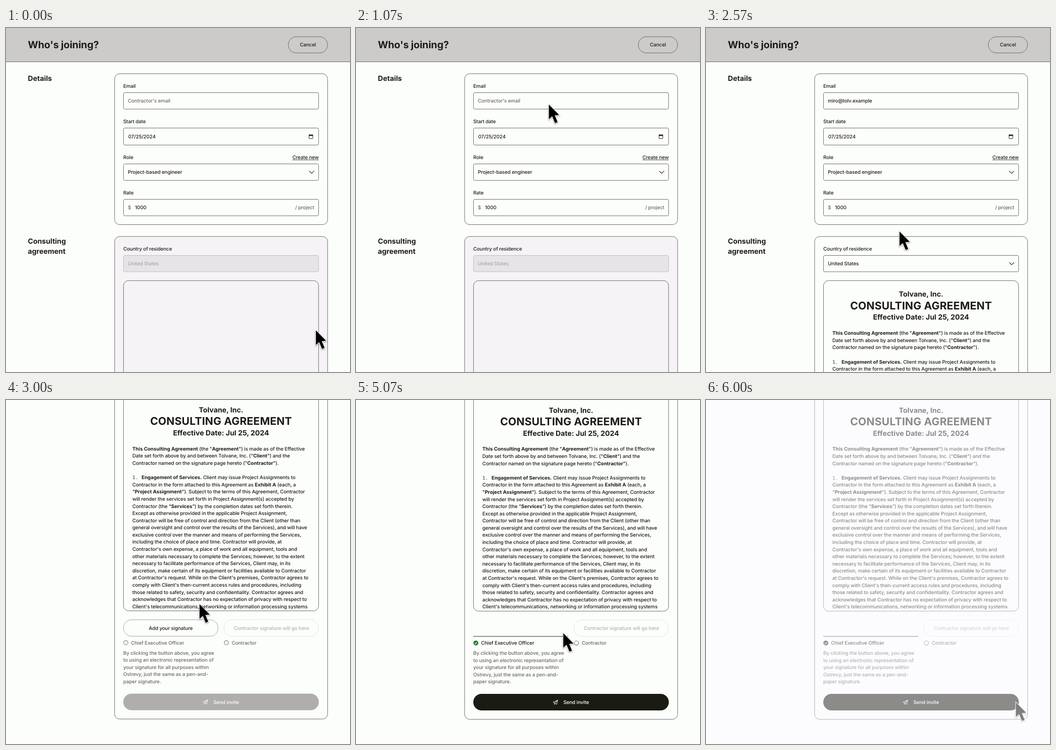
These frames come from a looping animation (748 px wide and 748 px high, 6030 ms). An HTML page with a canvas:

```html
<!DOCTYPE html>
<html lang="en">
<head>
<meta charset="utf-8">
<title>Invite a contractor</title>
<style>
  html, body { margin: 0; width: 100%; height: 100%; overflow: hidden; background: #fcfefb; }
  canvas { display: block; width: 748px; height: 748px; }
</style>
</head>
<body>
<canvas id="stage"></canvas>
<script>
const SIZE = 748, LOOP = 6030, LINE = 15.59;
const INK = '#1d1d17', GREY = '#6a6a67', PALE = '#b3b2b1', EDGE = '#62635f', PAPER = '#fcfefb';
const EMAIL = 'miro@tolv.example';
const SHOWN = 1800, SIGNED = 4470;

const canvas = document.getElementById('stage');
const ctx = canvas.getContext('2d');
const dpr = window.devicePixelRatio || 1;
canvas.width = canvas.height = SIZE * dpr;

const SANS = 'Inter, "Liberation Sans", sans-serif';
const MONO = '"Noto Sans Mono", "DejaVu Sans Mono", monospace';

// name: [weight, size, letter spacing, family]
const STYLES = {
  body: [500, 10.7, -0.1, SANS],
  bold: [700, 10.7, 0, SANS],
  mark: [500, 10.7, 0, MONO],
  title: [700, 21.6, -0.15, SANS],
  head: [700, 15.5, 0, SANS],
  big: [700, 23.2, 0.2, SANS]
};

const INTRO = [
  '*This Consulting Agreement* (the "*Agreement*") is made as of the Effective',
  'Date set forth above by and between Tolvane, Inc. ("*Client*") and the',
  'Contractor named on the signature page hereto ("*Contractor*").'
];
const TERMS = [
  '*Engagement of Services.* Client may issue Project Assignments to',
  'Contractor in the form attached to this Agreement as *Exhibit A* (each, a',
  '"*Project Assignment*"). Subject to the terms of this Agreement, Contractor',
  'will render the services set forth in Project Assignment(s) accepted by',
  'Contractor (the "*Services*") by the completion dates set forth therein.',
  'Except as otherwise provided in the applicable Project Assignment,',
  'Contractor will be free of control and direction from the Client (other than',
  'general oversight and control over the results of the Services), and will have',
  'exclusive control over the manner and means of performing the Services,',
  'including the choice of place and time. Contractor will provide, at',
  "Contractor's own expense, a place of work and all equipment, tools and",
  'other materials necessary to complete the Services; however, to the extent',
  'necessary to facilitate performance of the Services, Client may, in its',
  'discretion, make certain of its equipment or facilities available to Contractor',
  "at Contractor's request. While on the Client's premises, Contractor agrees to",
  "comply with Client's then-current access rules and procedures, including",
  'those related to safety, security and confidentiality. Contractor agrees and',
  'acknowledges that Contractor has no expectation of privacy with respect to',
  "Client's telecommunications, networking or information processing systems"
];
const NOTE = [
  'By clicking the button above, you agree',
  'to using an electronic representation of',
  'your signature for all purposes within',
  'Ostrevy, just the same as a pen-and-',
  'paper signature.'
];

const clamp = v => Math.min(1, Math.max(0, v));
const part = (t, from, to) => clamp((t - from) / (to - from));
const smooth = u => u * u * (3 - 2 * u);
const cubic = u => u < 0.5 ? 4 * u ** 3 : 1 - 4 * (1 - u) ** 3;
const mix = (a, b, u) => a + (b - a) * u;

function setStyle(style) {
  const [weight, size, gap, family] = STYLES[style];
  ctx.font = `${weight} ${size}px ${family}`;
  ctx.letterSpacing = gap + 'px';
  ctx.textRendering = 'geometricPrecision';
}

function text(str, x, y, style = 'body', color = INK, align = 'left') {
  setStyle(style);
  ctx.fillStyle = color;
  ctx.textAlign = align;
  ctx.fillText(str, x, y);
  return ctx.measureText(str).width;
}

// Text between asterisks is bold.
function rich(str, x, y) {
  str.split('*').forEach((run, i) => { if (run) x += text(run, x, y, i % 2 ? 'bold' : 'body'); });
}

function box(x0, y0, x1, y1, r, stroke, fill, dash = []) {
  ctx.beginPath();
  ctx.roundRect(x0, y0, x1 - x0, y1 - y0, r);
  if (fill) { ctx.fillStyle = fill; ctx.fill(); }
  if (stroke) {
    ctx.setLineDash(dash);
    ctx.strokeStyle = stroke;
    ctx.lineWidth = 1;
    ctx.stroke();
    ctx.setLineDash([]);
  }
}

function line(points, color, width, close) {
  ctx.beginPath();
  points.forEach(([x, y]) => ctx.lineTo(x, y));
  if (close) ctx.closePath();
  ctx.strokeStyle = color;
  ctx.lineWidth = width;
  ctx.lineJoin = 'round';
  ctx.stroke();
}

const field = (y0, y1) => box(255.5, y0, 679.7, y1, 3, EDGE);
const chevron = y => line([[659.3, y - 2.6], [664.6, y + 2.7], [669.9, y - 2.6]], INK, 1.2);

function ring(x, y) {
  ctx.beginPath();
  ctx.arc(x, y, 4.6, 0, 7);
  ctx.strokeStyle = GREY;
  ctx.lineWidth = 1.1;
  ctx.stroke();
}

function header() {
  ctx.fillStyle = '#cccbc9';
  ctx.fillRect(0, 0, SIZE, 73);
  ctx.fillStyle = EDGE;
  ctx.fillRect(0, 73, SIZE, 1);
  text("Who's joining?", 47.5, 43.5, 'title');
  box(613.8, 19, 699.2, 54.2, 17.6, EDGE);
  text('Cancel', 656.5, 40.3, 'body', INK, 'center');
}

function details(t) {
  text('Details', 47.5, 115, 'head');
  box(236.2, 99.5, 699.3, 427.5, 11, EDGE);

  text('Email', 255, 130);
  field(140.5, 176.3);
  const typed = Math.floor((t - 1215) / 33);
  if (typed > 0) text(EMAIL.slice(0, typed), 265, 162);
  else text("Contractor's email", 265, 162, 'body', GREY);

  text('Start date', 255, 206.7);
  field(217.5, 254.5);
  text('07/25/2024', 265.7, 240);
  box(659, 232.6, 667, 240.6, 0.8, INK);
  ctx.fillStyle = INK;
  ctx.fillRect(658.5, 232, 9, 2.6);
  ctx.fillRect(660, 231, 1.2, 1.5);
  ctx.fillRect(664.8, 231, 1.2, 1.5);

  text('Role', 255, 285);
  const w = text('Create new', 680, 285, 'body', INK, 'right');
  ctx.fillRect(680 - w, 286.4, w, 0.9);
  field(295.5, 331.3);
  text('Project-based engineer', 265, 317.4);
  chevron(313.5);

  text('Rate', 255, 361.7);
  field(372.5, 408.3);
  text('$', 265, 394.2, 'body', GREY);
  text('1000', 280.5, 394.2);
  text('/ project', 670.3, 394.2, 'body', GREY, 'right');
}

function contract() {
  ctx.save();
  ctx.beginPath();
  ctx.rect(256, 550, 423, 465.5);
  ctx.clip();
  text('Tolvane, Inc.', 467.6, 584.4, 'head', INK, 'center');
  text('CONSULTING AGREEMENT', 467.6, 611.7, 'big', INK, 'center');
  text('Effective Date: Jul 25, 2024', 467.6, 634.4, 'head', INK, 'center');
  INTRO.forEach((s, i) => rich(s, 274.7, 667.3 + i * LINE));
  text('1.', 274.7, 667.3 + 4 * LINE, 'mark');
  TERMS.forEach((s, i) => rich(s, i ? 274.7 : 294.7, 667.3 + (i + 4) * LINE));
  ctx.restore();
}

function plane(x, y) {
  line([[x, y + 4.6], [x + 10, y], [x + 7.8, y + 9.4], [x + 4.4, y + 7.2], [x + 2.7, y + 9.6], [x + 2.6, y + 6]],
    '#fff', 0.9, true);
  line([[x + 2.6, y + 6], [x + 10, y], [x + 4.4, y + 7.2]], '#fff', 0.8);
}

function signing(t, fade) {
  const done = t >= SIGNED;
  if (done) {
    ctx.fillStyle = INK;
    ctx.fillRect(255, 1070.4, 206.2, 1);
    ctx.beginPath();
    ctx.arc(260.6, 1085.2, 5.4, 0, 7);
    ctx.fillStyle = fade > 0 ? '#30312c' : '#257a27';
    ctx.fill();
    line([[258, 1085.3], [259.9, 1087.2], [263.3, 1083.3]], '#fff', 1.2);
  } else {
    box(255.5, 1035.3, 461, 1071.2, 18, EDGE, null, [2.2, 1.4]);
    text('Add your signature', 358.2, 1057.3, 'body', INK, 'center');
    ring(260.6, 1085.2);
  }
  text('Chief Executive Officer', 272, 1089.2, 'body', done ? INK : GREY);

  box(474, 1035.3, 679.7, 1071.2, 18, '#cfcfcd', null, [2.2, 1.4]);
  text('Contractor signature will go here', 577, 1057.3, 'body', PALE, 'center');
  ring(479.2, 1085.2);
  text('Contractor', 490.7, 1089.2, 'body', GREY);
  NOTE.forEach((s, i) => text(s, 255, 1111 + i * LINE, 'body', GREY));

  box(255, 1195.9, 680.2, 1232, 18, null, done ? '#1a1c14' : '#afaeac');
  plane(428.6, 1209.4);
  text('Send invite', 451, 1218.2, 'body', '#fff');
}

function agreement(t, fade) {
  const open = t >= SHOWN;
  text('Consulting', 47.5, 468.8, 'head');
  text('agreement', 47.5, 490.6, 'head');
  box(236.2, 453.3, 699.3, 1251.2, 11, EDGE, open ? PAPER : '#f6f3f7');
  text('Country of residence', 255, 483.6);
  if (open) field(494.5, 530);
  else box(255.5, 494.5, 679.7, 530, 3, '#bdbbbd', '#e6e4e7');
  text('United States', 265, 516, 'body', open ? INK : '#a9a7a9');
  box(255.5, 549.3, 679.7, 1016, 11, EDGE);
  if (open) {
    chevron(512.2);
    contract();
    signing(t, fade);
  }
}

function pointer(t) {
  if (t < 1150) {
    const u = cubic(part(t, 400, 1060)), v = 1 - u;
    return [v * v * 673 + 2 * u * v * 620 + u * u * 418.6, v * v * 657 + 2 * u * v * 400 + u * u * 166];
  }
  // start, end, from x, y, to x, y
  const moves = [
    [1150, 1930, 418.6, 166, 412.6, 160],
    [1960, 2600, 412.6, 160, 420, 443.5],
    [3080, 4080, 420, 443.5, 423.5, 488.5],
    [4917, 5680, 423.5, 488.5, 673, 657]
  ];
  const [a, b, x0, y0, x1, y1] = moves.filter(m => t >= m[0]).pop();
  const u = smooth(part(t, a, b));
  return [mix(x0, x1, u), mix(y0, y1, u)];
}

function cursor(x, y) {
  ctx.save();
  ctx.translate(x + 0.8, y + 0.6);
  ctx.beginPath();
  [[0, 0], [0, 31.6], [7.2, 25.4], [13.4, 40.3], [19, 38], [12.8, 23.3], [22.3, 22.5]]
    .forEach(([px, py]) => ctx.lineTo(px, py));
  ctx.closePath();
  ctx.shadowColor = 'rgba(0,0,0,.45)';
  ctx.shadowBlur = 3 * dpr;
  ctx.shadowOffsetY = 1.2 * dpr;
  ctx.strokeStyle = '#fff';
  ctx.lineWidth = 2.2;
  ctx.lineJoin = 'miter';
  ctx.stroke();
  ctx.shadowColor = 'transparent';
  ctx.fillStyle = '#000';
  ctx.fill();
  ctx.restore();
}

function draw(t) {
  const fade = 0.5 * Math.max(0, t - 5700) / 300;
  const scroll = 557.5 * cubic(part(t, 2600, 2990)) - (t >= SIGNED ? 0.6 : 0);

  ctx.setTransform(dpr, 0, 0, dpr, 0, 0);
  ctx.fillStyle = PAPER;
  ctx.fillRect(0, 0, SIZE, SIZE);
  ctx.save();
  ctx.translate(0, -scroll);
  header();
  details(t);
  agreement(t, fade);
  ctx.restore();
  cursor(...pointer(t));

  if (fade > 0) {
    ctx.globalAlpha = fade;
    ctx.fillStyle = '#fef9ff';
    ctx.fillRect(0, 0, SIZE, SIZE);
    ctx.globalAlpha = 1;
  }
}

function tick() {
  draw(performance.now() % LOOP);
  requestAnimationFrame(tick);
}
tick();
</script>
</body>
</html>
```
